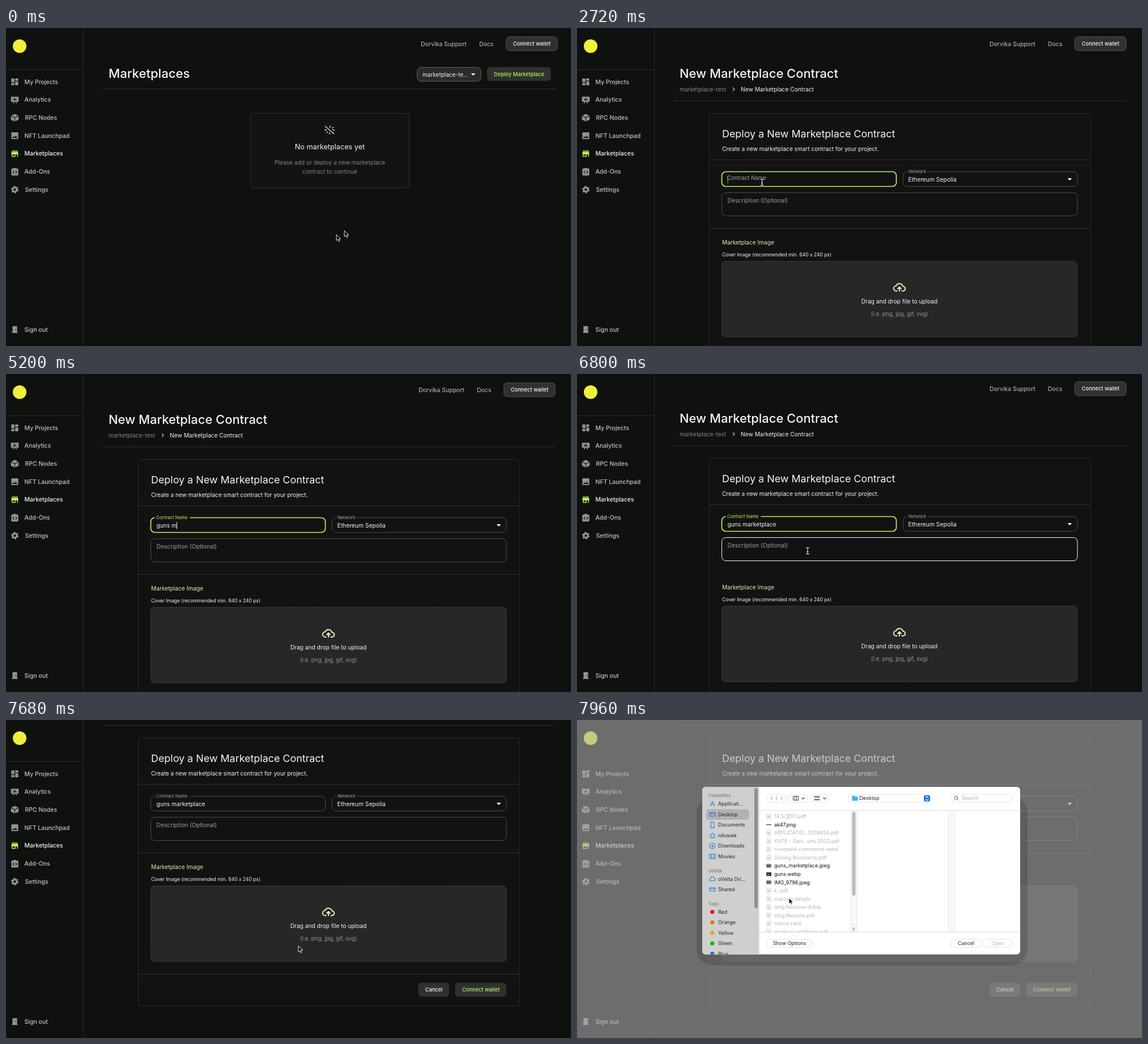
Recreate the animation shown at these times as an HTML page. Size 997 px wide and 561 px high, loop 8000 ms.

```html
<!DOCTYPE html>
<html lang="en">
<head>
<meta charset="utf-8">
<title>Marketplace contract</title>
<style>
html, body { margin: 0; width: 100%; height: 100%; overflow: hidden; background: #0f110f; }
svg { display: block; width: 100vw; height: 100vh; }
text { font-family: Inter, "Noto Sans CJK KR", "Noto Sans CJK", sans-serif; white-space: pre; }
</style>
</head>
<body>
<svg id="stage" viewBox="0 0 997 561"></svg>
<script>
const LIME = '#b8f55f', PALE = '#def5bd', WHITE = '#f3f5f3', SOFT = '#c3c5c3', DIM = '#858785', EDGE = '#303230';
const BG = '#0f110f', LOOP = 8000, SCROLL = 119;

// ---- drawing helpers; text is placed by its vertical centre ----
const text = (x, y, s, size, fill, more = '') =>
  `<text x="${x}" y="${y + size * 0.36}" font-size="${size}" fill="${fill}" ${more}>${s}</text>`;
const mid = (x, y, s, size, fill, more = '') => text(x, y, s, size, fill, 'text-anchor="middle" ' + more);
const rect = (x, y, w, h, r, fill, more = '') =>
  `<rect x="${x}" y="${y}" width="${w}" height="${h}" rx="${r}" fill="${fill}" ${more}/>`;
const line = (d, color, w = 1, more = '') =>
  `<path d="${d}" fill="none" stroke="${color}" stroke-width="${w}" ${more}/>`;
const shape = (d, fill, more = '') => `<path d="${d}" fill="${fill}" fill-rule="evenodd" ${more}/>`;
const at = (x, y, k, body) => `<g transform="translate(${x} ${y}) scale(${k}) translate(-12 -12)">${body}</g>`;
const button = (x, y, w, label, color, edge = 'none') =>
  rect(x - 0.5, y - 0.5, w + 0.5, 24.5, 6, '#2f312f', `stroke="${edge}"`) +
  mid(x + w / 2, y + 12, label, 9.3, color, 'font-weight="500"');
const outline = (x, y, w, h, gap = 0, r = 7) =>
  `M${x + r + gap} ${y}H${x + w - r}a${r} ${r} 0 0 1 ${r} ${r}V${y + h - r}a${r} ${r} 0 0 1 ${-r} ${r}` +
  `H${x + r}a${r} ${r} 0 0 1 ${-r} ${-r}V${y + r}a${r} ${r} 0 0 1 ${r} ${-r}`;
const caretDown = (x, y) => shape(`M${x - 4} ${y - 2}h8l-4 4z`, WHITE);

// ---- sidebar ----
const icons = {
  grid: c => shape('M3 3h8v10H3zM13 3h8v6h-8zM3 15h8v6H3zM13 11h8v10h-8z', c),
  chart: c => shape('M2 4h20v13h-6l2 4h-3l-2-4h-2l-2 4H6l2-4H2zM8 9h2v5H8zM11 7h2v7h-2zM14 10h2v4h-2z', c),
  cube: c => shape('M12 2 22 7v10l-10 5-10-5V7z', c) + line('M2 7l10 5 10-5M12 12v10', BG, 1.6),
  image: c => rect(3, 3, 18, 18, 2, c) + shape('M8.5 13.5l2.5 3L14.5 12l4.5 6H5z', BG),
  store: c => shape('M20 4H4v2h16zM21 14v-2l-1-5H4l-1 5v2h1v6h10v-6h4v6h2v-6zM12 18H6v-4h6z', c),
  code: c => rect(3, 4, 18, 18, 2, c) + rect(8, 2, 8, 5, 2, c) + line('M10 9.5 7 13l3 3.5M14 9.5l3 3.5-3 3.5', BG, 1.8),
  gear: c => `<circle cx="12" cy="12" r="5.3" fill="none" stroke="${c}" stroke-width="4.4"/>
    <circle cx="12" cy="12" r="8.2" fill="none" stroke="${c}" stroke-width="3" stroke-dasharray="4.6 3.99"/>`,
  door: c => shape('M6 3h12v16h2v2H4v-2h2zM13 11h2v2h-2z', c)
};
const menu = [['grid', 'My Projects', 95], ['chart', 'Analytics', 126.7], ['cube', 'RPC Nodes', 158.3, 33.5],
  ['image', 'NFT Launchpad', 190], ['store', 'Marketplaces', 221.7], ['code', 'Add-Ons', 253.5],
  ['gear', 'Settings', 285.2, 33.5], ['door', 'Sign out', 532]];
const sidebar = rect(0, 0, 136, 561, 0, BG) + line('M136.5 0V561M0 73.5H136', '#2b2d2b') +
  '<circle cx="24" cy="32" r="12" fill="#eef03a"/>' +
  menu.map(([icon, label, y, x = 32.5]) => {
    const on = icon === 'store';
    return at(15.5, y, 0.68, icons[icon](on ? LIME : '#929492')) +
      text(x, y, label, 10.5, on ? WHITE : SOFT, 'font-weight="450"');
  }).join('');

const header = x =>
  text(x, 28.5, 'Dorvika Support', 10.5, SOFT) + text(x + 103, 28.5, 'Docs', 10.5, SOFT) +
  button(x + 151, 16, 90, 'Connect wallet', WHITE, '#525452');

// ---- empty list page ----
const listPage = header(732) +
  text(181, 80.5, 'Marketplaces', 22.1, WHITE, 'font-weight="450"') +
  rect(725.5, 69.5, 112.5, 24.5, 7, '#2a2c2a', 'stroke="#616361"') +
  text(735, 82, 'marketplace-te...', 10, WHITE) + caretDown(824.5, 82) +
  button(849.5, 69.5, 112, 'Deploy Marketplace', LIME) +
  line('M170 107.5H973', EDGE) +
  rect(431.5, 150.5, 280, 131.5, 4, '#121312', `stroke="${EDGE}"`) +
  line('M-8-7 8 7M1-8V-4M7-5 4-3M9 0H5M-9 0h4M-6 5l3-2M0 8V4', PALE, 1.3, 'transform="translate(571 180)"') +
  mid(571.5, 209, 'No marketplaces yet', 12.7, WHITE) +
  mid(571.5, 237.5, 'Please add or deploy a new marketplace', 10.2, DIM) +
  mid(571.5, 253.5, 'contract to continue', 10.2, DIM);

// ---- contract form page ----
const formPage = header(728) +
  text(181, 80.5, 'New Marketplace Contract', 21.9, WHITE, 'font-weight="450"') +
  text(181, 108, 'marketplace-test', 10.2, DIM) + line('M275 105l3 3-3 3', SOFT, 1.2) +
  text(289, 108, 'New Marketplace Contract', 10.2, WHITE) +
  line('M170 128.5H968', EDGE) +
  rect(233.5, 150.5, 672.5, 473, 4, '#121212', 'stroke="#2a2c2a"') +
  text(256, 186.8, 'Deploy a New Marketplace Contract', 17.9, WHITE) +
  text(256, 213.5, 'Create a new marketplace smart contract for your project.', 10.1, WHITE) +
  line('M233.5 232.5H906M233.5 567.5H906', EDGE) +
  line('M233.5 353.5H906', EDGE, 1, 'id="rule"') +
  '<path id="nameBox" fill="none"/>' + text(265, 0, 'Contract Name', 10.2, DIM, 'id="nameLabel"') +
  text(265.5, 267, '', 10.2, WHITE, 'id="typed"') + rect(0, 261, 1, 12.5, 0, WHITE, 'id="caret"') +
  line(outline(575.5, 253.5, 307.5, 26, 36), '#4a4c4a') +
  text(585, 253.7, 'Network', 7.75, '#a5a7a5') + text(584.5, 267, 'Ethereum Sepolia', 10.3, WHITE) + caretDown(869.5, 267) +
  line(outline(255.5, 290.5, 627.5, 41), '#4a4c4a', 1, 'id="descBox"') +
  text(265.5, 304.3, 'Description (Optional)', 10.3, '#9b9d9b') +
  text(256, 378.3, 'Marketplace Image', 10.2, '#d3f7a0') +
  text(256, 400, 'Cover Image (recommended min. 640 x 240 px)', 8.5, WHITE) +
  rect(255.5, 411.5, 627.5, 133.5, 6, '#272727', 'stroke="#484848" stroke-dasharray="2 1.5"') +
  at(569, 457.5, 0.92, line('M8 19H6a4.8 4.8 0 0 1-.6-9.6A7 7 0 0 1 18.7 10 4.5 4.5 0 0 1 18.5 19H16', PALE, 2.2) +
    line('M12 20v-8M8.3 15.2 12 11.5l3.7 3.7', PALE, 2.2)) +
  mid(569, 482.7, 'Drag and drop file to upload', 10.2, WHITE) +
  mid(569, 504, '(i.e. png, jpg, gif, svg)', 9.8, '#959595') +
  button(728, 583, 54, 'Cancel', WHITE) + button(793, 583, 90, 'Connect wallet', LIME);

// ---- file dialog ----
const BLUE = '#1b7fe6', INK = '#262626', FADED = '#b4b4b4';
const places = ['Applicati...', 'Desktop', 'Documents', 'nilvarek', 'Downloads', 'Movies'];
const placeIcons = ['M1 9 5 1l4 8M2 6h6', 'M0 2h10v6H0zM0 4h10', 'M2 0h4l2 2v8H2z', 'M0 5l5-4 5 4M2 4v5h6V4',
  'M5 0a5 5 0 1 0 .1 0M5 2v5M3 5l2 2 2-2', 'M0 1h10v8H0zM3 1v8M7 1v8'];
const tags = [['Red', '#f5060a'], ['Orange', '#e8700c'], ['Yellow', '#f0a012'], ['Green', '#10b410'], ['Blue', '#0a6cf0']];
const files = ['14.도람비1.pdf', 'ak47.png', 'APPLICATIO...3359054.pdf', 'KVTE - Seni...ults 2022.pdf',
  'nuvopaid-commerce-seed', 'Golang Bootcamp.pdf', 'guns_marketplace.jpeg', 'guns.webp', 'IMG_9796.jpeg', 'k;.pdf',
  'maruvin details', 'long Resume-dubai', 'long Resume.pdf', 'mama card', 'medical certificate.pdf'];
const thumbs = {
  png: rect(334, -0.8, 9, 1.8, 0.5, '#6d6660'),
  jpeg: rect(334, -3.5, 9, 7, 0.5, '#8d8d8f') + rect(335, -1, 6, 2, 0, '#3c3c3e'),
  webp: rect(334, -3, 9, 6.5, 0.5, '#2e2b28') + rect(335, 0, 6, 1.5, 0, '#a8987c')
};
const sideIcon = (y, d) => line(d, BLUE, 1.1, `transform="translate(234 ${y - 5})"`);
const heading = (y, s) => text(232, y, s, 7.8, '#858583', 'font-weight="600"');
const place = (y, s) => text(249, y, s, 8.9, INK);
const pill = (x, w, y, h) => rect(x, y, w, h, 4, '#fff', 'stroke="#dedede" stroke-width=".8"');
const chevron = (x, y) => line(`M${x - 2.5} ${y - 1}l2.5 2.5 2.5-2.5`, '#444', 1.2);
const page = rect(335, -4.5, 7, 9, 0.8, '#f4f4f4', 'stroke="#cfcfcf" stroke-width=".8"') + rect(336.5, -1, 4, 3, 0, '#cbd0dc');

const fileRow = (name, i) => {
  const thumb = thumbs[name.split('.').pop()];
  return `<g transform="translate(0 ${170 + i * 14.54})">` + (thumb || page) +
    text(348, 0, name, 8.95, thumb ? '#111' : FADED) + '</g>';
};
const strip = x => rect(x, 160, 10.5, 214, 0, '#f8f8f8', 'stroke="#e2e2e2" stroke-width=".8"');

const dialog = rect(211, 135, 584, 298, 28, '#000', 'opacity=".14"') +
  '<g clip-path="url(#sheet)">' + rect(221, 118, 561, 296, 0, '#fff') + rect(221, 118, 100.5, 296, 0, '#cfcfcd') +
  heading(133.5, 'Favourites') + rect(228, 157.5, 75.5, 18.5, 4, '#b2b2b0') +
  places.map((s, i) => sideIcon(148 + i * 18.55, placeIcons[i]) + place(148 + i * 18.55, s)).join('') +
  heading(266, 'oVelta') + sideIcon(280.5, 'M2 8a2 2 0 0 1 0-4 3 3 0 0 1 6 0 2 2 0 0 1 0 4z') + place(280.5, 'oVelta Dri...') +
  sideIcon(299, 'M0 2h10v6H0zM0 4h10') + place(299, 'Shared') +
  heading(324, 'Tags') +
  tags.map(([s, c], i) => `<circle cx="238.7" cy="${338.5 + i * 18.5}" r="3.6" fill="${c}"/>` + place(338.5 + i * 18.5, s)).join('') +
  rect(313, 120, 6, 212, 3, '#8f8f8d') +
  pill(335, 33.5, 132, 13) + line('M345 135l-3 3 3 3', FADED, 1.2) + line('M352 134v8', '#999') + line('M359.5 135l3 3-3 3', FADED, 1.2) +
  pill(374, 33, 132, 13) + line('M381.5 134.5h9v7h-9zM384.5 134.5v7M387.5 134.5v7', '#444') + chevron(399, 138) +
  pill(413, 31, 132, 13) + line('M419 135.5h9M419 140.5h9', '#444', 2.6, 'stroke-dasharray="2.4 .9"') + chevron(437, 138) +
  pill(479, 145.5, 131.5, 13.5) + shape('M485.5 133.5h4l1 1.5h5v7.5h-10z', '#3fb2ee') +
  text(498, 138, 'Desktop', 9.1, '#222') + rect(612, 132.8, 11, 11, 3, '#1677ee') +
  line('M615.3 137l2.2-2.2 2.2 2.2M615.3 139.8l2.2 2.2 2.2-2.2', '#fff', 1.2) +
  pill(660, 108, 131.5, 13.5) + '<circle cx="669" cy="137.3" r="2.8" fill="none" stroke="#555"/>' + line('M671 139.5l2.6 2.6', '#555') +
  text(679, 138, 'Search', 9, FADED) +
  line('M321.5 159.5H782M321.5 374.5H782', '#e0e0e0') +
  '<g clip-path="url(#rows)">' + files.map(fileRow).join('') + strip(483.5) + strip(655.5) + '</g>' +
  rect(485.5, 162, 6, 148, 3, '#bcbcbc') + line('M487 366v5.5M489.5 366v5.5', '#888') +
  pill(335, 80, 386.8, 14) + mid(375, 394, 'Show Options', 8.9, '#222') +
  pill(660, 53, 386.8, 14) + mid(686.5, 394, 'Cancel', 8.9, '#222') +
  pill(717, 51, 386.8, 14) + mid(742.5, 394, 'Open', 8.9, FADED) + '</g>';

const arrow = '<path d="M0 0v10.5l2.5-2.2 1.7 3.8 1.8-.8-1.7-3.7h3.4z" fill="#0a0a0a" stroke="#fff" stroke-width=".9"/>';
const beamPath = 'M-3-5.5h2l1 1 1-1h2M0-4.5v9M-3 5.5h2l1-1 1 1h2M-1.5 1.5h3';

document.getElementById('stage').innerHTML =
  `<defs><clipPath id="sheet">${rect(221, 118, 561, 295.5, 6, '#000')}</clipPath>
   <clipPath id="rows">${rect(321, 160, 461, 214, 0, '#000')}</clipPath></defs>` +
  rect(0, 0, 997, 561, 0, BG) +
  `<g id="list">${listPage}</g><g id="form">${formPage}</g>${sidebar}` +
  rect(0, 0, 997, 561, 0, '#afaeaf', 'id="veil"') + `<g id="dialog">${dialog}</g>` +
  `<g id="ghost" transform="translate(583 364.5)">${arrow}</g>` +
  `<g id="arrow">${arrow}</g><g id="beam">${line(beamPath, '#000', 2.6) + line(beamPath, '#fff', 1.1)}</g>`;

// ---- motion ----
const $ = id => document.getElementById(id);
const el = Object.fromEntries(['list', 'form', 'rule', 'nameBox', 'nameLabel', 'typed', 'caret', 'descBox', 'veil',
  'dialog', 'ghost', 'arrow', 'beam'].map(id => [id, $(id)]));
const set = (node, attrs) => { for (const k in attrs) node.setAttribute(k, attrs[k]); };
const show = (node, on) => { node.style.display = on ? '' : 'none'; };
const ramp = (t, from, span) => Math.min(1, Math.max(0, (t - from) / span));
const inOut = p => p < 0.5 ? 2 * p * p : 1 - 2 * (1 - p) * (1 - p);
const mix = (a, b, p) => a + (b - a) * p;

const NAME = 'guns marketplace', OPEN = 1560, FOCUS = 2700, BLUR = 7640;
const keyTimes = [4000, 4220, 4440, 4660, 4880, 5160, 5400, ...Array.from({ length: 9 }, (_, i) => 5600 + i * 85)];
const route = [[520, 597, 357.5], [1240, 903, 84], [1980, 903, 84], [2600, 326.5, 272], [6440, 326.5, 272],
  [6720, 407, 312], [7200, 407, 312], [7600, 516, 398.5], [7760, 516, 398.5], [7960, 374, 314]];

function pointer(t) {
  const i = route.findIndex(k => k[0] > t);
  if (i === 0) return route[0].slice(1);
  if (i < 0) return route[route.length - 1].slice(1);
  const [a, b] = [route[i - 1], route[i]], p = inOut((t - a[0]) / (b[0] - a[0]));
  return [mix(a[1], b[1], p), mix(a[2], b[2], p)];
}

function draw(t) {
  const onForm = t >= OPEN, [x, y] = pointer(t);
  const scroll = Math.round(SCROLL * inOut(ramp(t, 6756, 444)));
  const over = (l, top, r, bottom) => onForm && x > l && x < r && y + scroll > top && y + scroll < bottom;
  const overName = over(256, 254, 563, 280), overDesc = over(256, 291, 883, 332);
  const focus = t >= FOCUS && t < BLUR;

  show(el.list, !onForm);
  show(el.form, onForm);
  set(el.form, { transform: `translate(0 ${-scroll})` });
  show(el.rule, !(scroll > 0 && scroll < 5));

  const float = 1 - (1 - ramp(t, 2708, 200)) ** 4;
  set(el.nameBox, {
    d: outline(255.5, 253.5, 308, 26, float > 0.5 ? 62 : 0),
    stroke: focus ? LIME : overName ? WHITE : '#4a4c4a', 'stroke-width': focus ? 1.7 : 1
  });
  const size = mix(10.2, 7.75, float);
  set(el.nameLabel, {
    'font-size': size, y: mix(267, 253.7, float) + size * 0.36,
    fill: focus && float > 0.4 ? LIME : '#a0a2a0'
  });
  set(el.descBox, { stroke: overDesc ? WHITE : '#4a4c4a' });

  const count = keyTimes.filter(k => k <= t).length;
  el.typed.textContent = NAME.slice(0, count);
  const since = t - (count ? keyTimes[count - 1] : FOCUS);
  show(el.caret, focus && since % 1000 < 500);
  set(el.caret, { x: 265.5 + (count ? el.typed.getComputedTextLength() : 0), opacity: count ? 1 : 0.6 });

  const p = ramp(t, 7704, 200), e = 1 - (1 - p) ** 2;
  set(el.veil, { opacity: 0.59 * e });
  show(el.dialog, p > 0);
  set(el.dialog, { opacity: Math.min(1, p * 3.2), transform: `translate(0 ${-24.5 * (1 - e)})` });

  const hidden = t >= keyTimes[0] && t < 6440, beam = overName || overDesc;
  show(el.ghost, t < 520);
  show(el.arrow, !hidden && !beam);
  show(el.beam, !hidden && beam);
  set(beam ? el.beam : el.arrow, { transform: `translate(${x} ${y})` });
}

let start;
function tick(now) {
  start ??= now;
  draw((now - start) % LOOP);
  requestAnimationFrame(tick);
}
draw(0);
requestAnimationFrame(tick);
</script>
</body>
</html>
```
